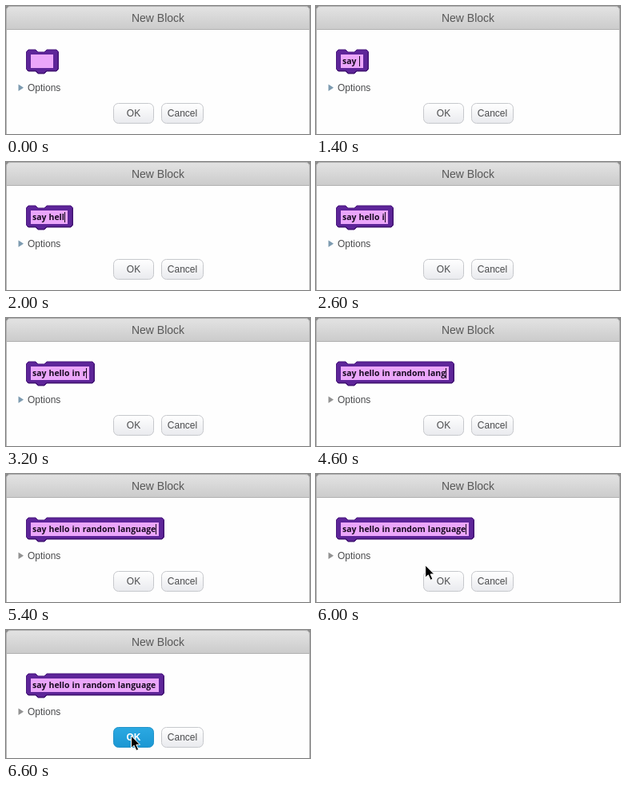
Animation of 380 by 161 pixels, one loop 6.8 s. Source, as an HTML page:

```html
<!DOCTYPE html>
<html lang="en">
<head>
<meta charset="utf-8">
<title>New Block</title>
<style>
  html, body { margin: 0; width: 100%; height: 100%; overflow: hidden; background: #fefefe; }
  svg { display: block; width: 380px; height: 161px; }
  text { font: 12px "Liberation Sans", Arial, sans-serif; fill: #4a4b4d; }
  .title { font-size: 14px; fill: #585858; }
  #label { font: 700 10.45px "Open Sans", "Noto Sans", sans-serif; fill: #180a20; white-space: pre; word-spacing: .4px; }
  .button rect { fill: url(#plain); stroke: #c6c8cc; }
  .pressed rect { fill: url(#blue); stroke: #2393c9; }
  .pressed text { fill: #fff; font-weight: bold; }
</style>
</head>
<body>
<svg viewBox="0 0 380 161">
  <defs>
    <linearGradient id="bar" x2="0" y2="1">
      <stop stop-color="#e3e3e3"/><stop offset="1" stop-color="#cbcbcb"/>
    </linearGradient>
    <linearGradient id="plain" x2="0" y2="1">
      <stop stop-color="#fff"/><stop offset="1" stop-color="#e9eaee"/>
    </linearGradient>
    <linearGradient id="blue" x2="0" y2="1">
      <stop stop-color="#2ba9e2"/><stop offset="1" stop-color="#1b97d3"/>
    </linearGradient>
  </defs>

  <rect width="380" height="161" fill="#8c8c8c"/>
  <path d="M.5 161V6q0-5.5 5.5-5.5H374q5.5 0 5.5 5.5V161" fill="#fefefe" stroke="#b2b2b2"/>
  <path d="M.5 29.5V6q0-5.5 5.5-5.5H374q5.5 0 5.5 5.5V29.5Z" fill="url(#bar)" stroke="#b0b0b0"/>
  <text class="title" x="190" y="20" text-anchor="middle">New Block</text>

  <path id="body" fill="#5e2599" stroke="#49187d"/>
  <path id="shade" fill="none" stroke="#3e126c"/>
  <rect id="field" x="31" y="61" height="17" fill="#eba6fa"/>
  <text id="label" x="33" y="73"></text>
  <rect id="caret" y="63" width="1" height="13" fill="#180a20"/>

  <path id="arrow" d="M15.5 98.5V107L22 102.7Z"/>
  <text x="27" y="107">Options</text>
  <g class="button" id="ok">
    <rect x="134.5" y="122.5" width="50" height="25" rx="6"/>
    <text x="159.5" y="139" text-anchor="middle">OK</text>
  </g>
  <g class="button">
    <rect x="194.5" y="122.5" width="52" height="25" rx="6"/>
    <text x="220.5" y="139" text-anchor="middle">Cancel</text>
  </g>
  <path id="pointer" d="M0 0V15.5L3.6 12.2L6.4 18.6L9.2 17.4L6.4 11.2H11Z" fill="#000" stroke="#fff"/>
</svg>
<script>
  const LOOP = 6800, STEP = 200;
  const PHRASE = "say hello in random language";
  // Letters typed after each step
  const TYPED = [0, 0, 0, 0, 1, 2, 3, 4, 5, 6, 8, 9, 10, 11, 12, 13, 14,
                 16, 18, 20, 21, 22, 23, 24, 26, 28];
  const $ = id => document.getElementById(id);
  const set = (id, attrs) => {
    for (const key in attrs) $(id).setAttribute(key, attrs[key]);
  };

  function drawBlock(count) {
    const label = $("label");
    label.textContent = PHRASE.slice(0, count);
    const caret = Math.round(33 + (count ? label.getComputedTextLength() : 0));
    const right = Math.max(65.5, caret + 10.5);
    set("body", { d: `M25.5 57.5L28 55H37L40 58H48L51 55H${right - 2.5}L${right} 57.5V79.5` +
      `L${right - 2.5} 82H51L48 85H40L37 82H28L25.5 79.5Z` });
    set("shade", { d: `M26 80.5L28 81.5H37.5L40.5 84.5H47.5L50.5 81.5H${right - 3}L${right - .5} 79V58` });
    set("field", { width: right - 37.5 });
    set("caret", { x: caret });
  }

  function movePointer(time) {
    const p = Math.min(1, Math.max(0, (time - 5800) / 600));
    const ease = 1 - (1 - p) ** 2;
    set("pointer", {
      transform: `translate(${112 + 44.5 * ease} ${92 + 41 * ease})`,
      visibility: time >= 5800 ? "visible" : "hidden"
    });
  }

  let last = -1;
  const start = performance.now();
  function frame(now) {
    const step = Math.floor((Math.max(0, now - start) % LOOP) / STEP);
    if (step !== last) {
      last = step;
      const time = step * STEP, pressed = time >= 6600;
      drawBlock(TYPED[Math.min(step, TYPED.length - 1)]);
      set("caret", { visibility: step > 0 && !pressed ? "visible" : "hidden" });
      set("arrow", { fill: time < 3800 ? "#7d9bb0" : "#929292" });
      $("ok").classList.toggle("pressed", pressed);
      movePointer(time);
    }
    requestAnimationFrame(frame);
  }
  frame(start);
</script>
</body>
</html>
```
